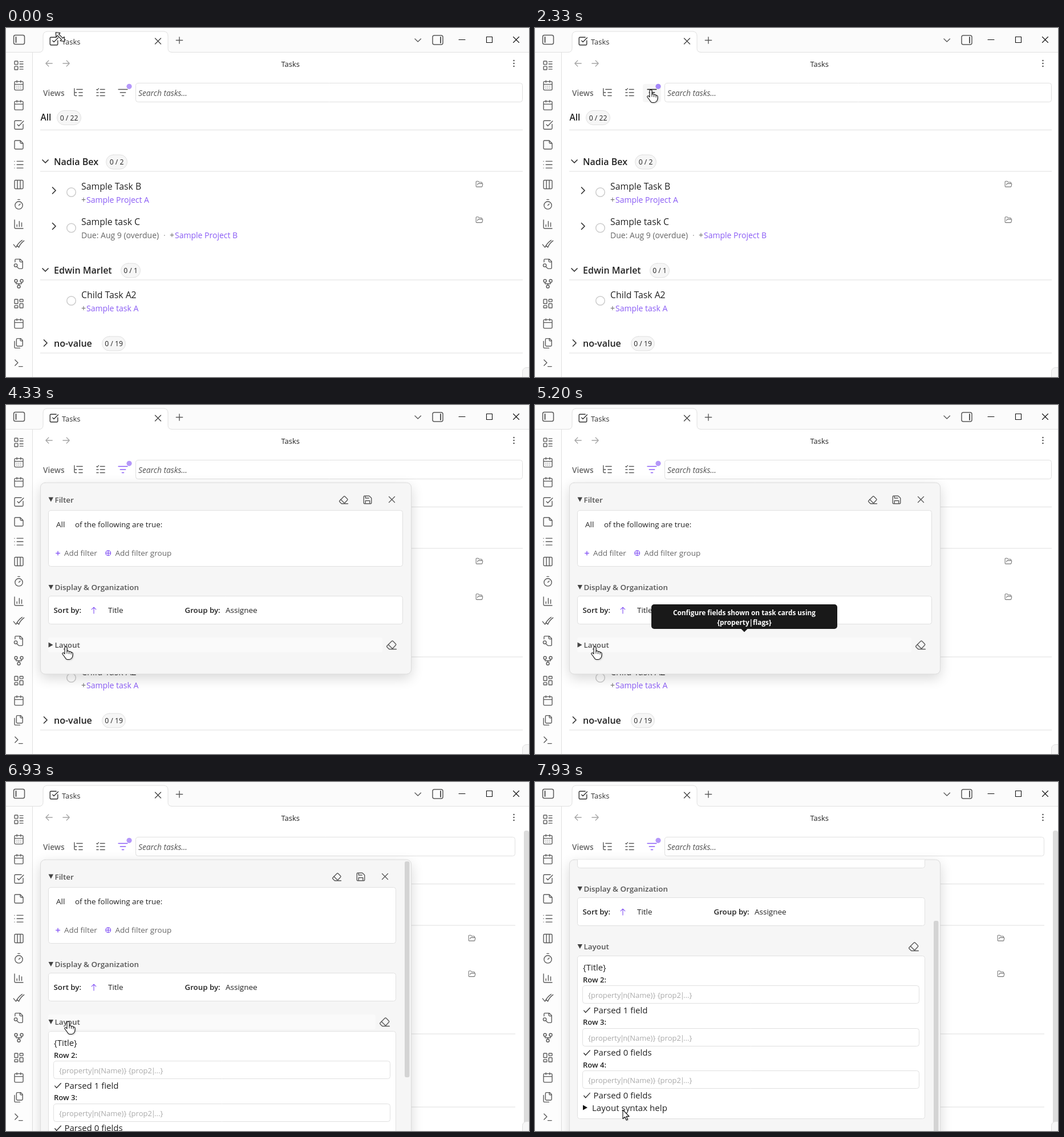
Recreate the animation shown at these times as an HTML page with a canvas. Size 917x611 px, loop 8000 ms.

```html
<!DOCTYPE html>
<html lang="en">
<head>
<meta charset="utf-8">
<title>Tasks</title>
<style>
html, body { margin: 0; width: 100%; height: 100%; overflow: hidden; background: #fff; }
canvas { display: block; }
</style>
</head>
<body>
<canvas id="stage" width="917" height="611"></canvas>
<script>
const ctx = document.getElementById('stage').getContext('2d');
const STEP = 8000 / 120;
const FONT = '"Open Sans", "Noto Sans", sans-serif';
const INK = '#222', GREY = '#5a5a5a', LINE = '#e0e0e0', SOFT = '#f6f6f6', PURPLE = '#8a5cf5';

const box = (x, y, w, h, r = 0) => r
  ? `M${x + r} ${y}h${w - 2 * r}a${r} ${r} 0 0 1 ${r} ${r}v${h - 2 * r}a${r} ${r} 0 0 1 ${-r} ${r}h${2 * r - w}a${r} ${r} 0 0 1 ${-r} ${-r}v${2 * r - h}a${r} ${r} 0 0 1 ${r} ${-r}z`
  : `M${x} ${y}h${w}v${h}h${-w}z`;
const ring = (x, y, r) => `M${x + r} ${y}a${r} ${r} 0 1 1 ${-2 * r} 0a${r} ${r} 0 1 1 ${2 * r} 0`;
const dots = (xs, y) => xs.map(x => `M${x} ${y}h.01`).join('');
const calendar = box(3, 4, 18, 18, 2) + 'M3 10h18M8 2v4M16 2v4';

// Icons on a 24 unit grid
const ICONS = {
  blocks: box(3, 3, 7, 7, 1) + box(3, 14, 7, 7, 1) + 'M14 4h7M14 9h7M14 15h7M14 20h7',
  days: calendar + dots([8, 12, 16], 14) + dots([8, 12, 16], 18),
  calendar,
  check: 'M21 10.5V19a2 2 0 0 1-2 2H5a2 2 0 0 1-2-2V5a2 2 0 0 1 2-2h12.5M9 11l3 3L22 4',
  note: 'M15 3H5a2 2 0 0 0-2 2v14a2 2 0 0 0 2 2h14a2 2 0 0 0 2-2V9zM15 3v4a2 2 0 0 0 2 2h4',
  list: 'M3 5h.01M3 12h.01M3 19h.01M8 5h13M8 12h13M8 19h13',
  columns: box(3, 3, 18, 18, 2) + 'M9 3v18M15 3v18',
  timer: 'M10 2h4M12 14l3-3' + ring(12, 14, 8),
  chart: 'M3 3v16a2 2 0 0 0 2 2h16M8 17v-4M13 17V6M18 17V9',
  checks: 'M1 13l5 6C9 13 13 8 19 4M8 15l4 4C14 13 18 9 23 5',
  search: 'M14 2v4a2 2 0 0 0 2 2h4M4 8V4a2 2 0 0 1 2-2h9l5 5v13a2 2 0 0 1-2 2h-6M7.5 17.5L11 21' + ring(5.5, 15, 3.2),
  fork: ring(12, 18, 3) + ring(6, 6, 3) + ring(18, 6, 3) + 'M18 9v2q0 1-1 1H7q-1 0-1-1V9M12 12v3',
  board: box(3, 3, 7, 9, 1) + box(14, 3, 7, 5, 1) + box(14, 12, 7, 9, 1) + box(3, 16, 7, 5, 1),
  files: 'M20 7h-3a2 2 0 0 1-2-2V2M9 18a2 2 0 0 1-2-2V4a2 2 0 0 1 2-2h7l4 4v10a2 2 0 0 1-2 2zM3 7.6v12.8a1.6 1.6 0 0 0 1.6 1.6h9.8',
  terminal: 'M4 17l6-6-6-6M12 19h8',
  back: 'M20 12H4M11 5l-7 7 7 7',
  next: 'M4 12h16M13 5l7 7-7 7',
  tree: 'M8 5h13M13 12h8M13 19h8M3 3v14a2 2 0 0 0 2 2h3M3 10a2 2 0 0 0 2 2h3',
  steps: 'M11 5h10M11 12h10M11 19h10M3 5l1.5 1.5L7.5 3M3 12h4M3 19h4',
  filter: 'M2 5h20M6 12h12M10 19h4',
  folder: 'M6 14l1.5-2.9A2 2 0 0 1 9.2 10H20a2 2 0 0 1 1.9 2.5l-1.5 6a2 2 0 0 1-2 1.5H4a2 2 0 0 1-2-2V5a2 2 0 0 1 2-2h3.9a2 2 0 0 1 1.7.9l.8 1.2a2 2 0 0 0 1.7.9H18a2 2 0 0 1 2 2v2',
  eraser: 'M7 21l-4.3-4.3q-1.4-1.4 0-2.8l9.6-9.6q1.4-1.4 2.8 0l5.6 5.6q1.4 1.4 0 2.8L13 21M22 21H7M5 11l9 9',
  save: 'M15.2 3a2 2 0 0 1 1.4.6l3.8 3.8a2 2 0 0 1 .6 1.4V19a2 2 0 0 1-2 2H5a2 2 0 0 1-2-2V5a2 2 0 0 1 2-2zM17 21v-7H7v7M7 3v5h8',
  close: 'M18 6L6 18M6 6l12 12',
  plus: 'M4 12h16M12 4v16',
  circlePlus: ring(12, 12, 10) + 'M2 12h20M12 2v20',
  up: 'M12 22V3M5 9l7-7 7 7',
  tick: 'M3 13l5 6L21 5'
};
const RIBBON = 'blocks days calendar check note list columns timer chart checks search fork board calendar files terminal'.split(' ');

const HAND = 'M-2 2C-2-.5 2-.5 2 2V8C3 7 5.3 7.3 5.5 9C7 8 9 8.5 9 10.2C10.5 9.6 12 10.4 12 12V15C12 19 9 22.5 6 22.5H2.5C0 22.5-1 20-2.5 17.5L-6 13C-7 11.5-5 10-3.5 11.2L-2 12.8Z';
const ARROW = 'M0 0V15.5L3.6 12.3L6.2 18L8.6 17L6 11.4H11Z';
const RESIZE = 'M-11 0L-5-5V-1.5H5V-5L11 0L5 5V1.5H-5V5Z';

// Pointer stops: step, x, y
const PATH = [
  [0, 95, 15], [3, 154, 16], [5, 154, 16], [6, 156, 25], [10, 156, 25], [13, 155, 33],
  [15, 155, 33], [23, 200, 96], [24, 200, 96], [30, 203, 108], [42, 203, 108],
  [47, 166, 184], [55, 219, 314], [62, 103, 424], [64, 103, 424], [65, 105, 423],
  [93, 105, 423], [101, 107, 421], [103, 107, 421], [104, 109, 419], [111, 109, 419], [119, 154, 574]
];

function text(s, x, y, size = 13.5, color = INK, weight = 400, style = '') {
  ctx.font = `${style} ${weight} ${size}px ${FONT}`;
  ctx.fillStyle = color;
  ctx.fillText(s, x, y);
}
function stroke(d, color = GREY, width = 1.5) {
  ctx.strokeStyle = color;
  ctx.lineWidth = width;
  ctx.stroke(new Path2D(d));
}
function fill(d, color) {
  ctx.fillStyle = color;
  ctx.fill(new Path2D(d));
}
function icon(name, x, y, size = 20, color = GREY, width = 1.4) {
  const k = size / 24;
  ctx.save();
  ctx.translate(x - size / 2, y - size / 2);
  ctx.scale(k, k);
  stroke(ICONS[name], color, width / k);
  ctx.restore();
}
function frame(x, y, right, bottom, r = 4, bg = '#fff') {
  const d = box(x + .5, y + .5, right - x - 1, bottom - y - 1, r);
  fill(d, bg);
  stroke(d, LINE, 1);
}
const rule = (y, right) => fill(box(60, y, right - 60, 1), LINE);
const chevron = (x, y, down) =>
  stroke(down ? `M${x - 5} ${y - 2.5}l5 5 5-5` : `M${x - 2.5} ${y - 5.5}l5.5 5.5-5.5 5.5`, '#333', 1.7);
const triangle = (x, y, down, color = '#444') =>
  fill(down ? `M${x} ${y - 4}h8.5l-4.25 8z` : `M${x} ${y - 4.5}v9l8-4.5z`, color);

function badge(s, x, right, y) {
  frame(x, y, right, y + 26, 12.5, SOFT);
  ctx.textAlign = 'center';
  text(s, (x + right) / 2, y + 17.5, 12.2, INK, 500);
  ctx.textAlign = 'left';
}
function group(name, y, count, x, right, edge, open = true) {
  chevron(69, y, open);
  text(name, 84, y + 6.5, 16, INK, 600);
  badge(count, x, right, y - 12);
  rule(y + 17, edge);
}
function task(name, y, link, edge, parent, due) {
  if (parent) {
    chevron(84, y + 8, false);
    icon('folder', edge - 76, y - 3, 14, '#777', 1.1);
  }
  stroke(ring(114.5, y + 11, 7.8), '#ccc', 1.5);
  text(name, 132, y + 6, 15.8);
  let x = 132;
  if (due) {
    text(due, x, y + 29, 14, '#666');
    text('·', 276, y + 29, 14, '#999');
    x = 287;
  }
  text('+', x, y + 29, 14, '#666');
  text(link, x + 9, y + 29, 14, PURPLE);
}

function chrome() {
  fill(box(0, 0, 917, 43), '#fbfbfb');
  fill(box(0, 42, 46, 569), '#fdfdfd');
  fill(box(0, 42, 917, 1), LINE);
  fill(box(46, 42, 1, 569), LINE);
  const tab = 'M58 42.5q7 0 7-7V14q0-8 8-8h203q8 0 8 8v21.5q0 7 7 7';
  fill(tab + 'v1H58z', '#fff');
  stroke(tab, LINE, 1);
  icon('check', 84, 23, 18, '#333', 1.4);
  text('Tasks', 98, 28.5, 12.9, '#333');
  icon('close', 266.5, 23, 20, '#444');
  icon('plus', 304, 21.5, 17);
  stroke(box(13.5, 12.5, 19, 16, 3));
  stroke('M17.5 16v9', GREY, 2);
  stroke(box(748, 13, 18, 16, 3));
  stroke('M762 16v10', GREY, 2);
  stroke('M717 19l5.2 5 5.2-5', GREY, 1.4);
  stroke('M794 20.5h11' + box(842.5, 15.5, 10, 10) + 'M889.5 15.5l10 10M899.5 15.5l-10 10', '#111', 1.1);
  RIBBON.forEach((name, i) => icon(name, 22.5, 65.5 + i * 34.75));
  icon('back', 75.5, 62, 17, '#a5a5a5', 1.3);
  icon('next', 105.5, 62, 17, '#a5a5a5', 1.3);
  text('Tasks', 482.5, 67.5, 12.9, INK, 500);
  for (const y of [57, 62, 67]) fill(ring(890.5, y, 1.3), '#555');
}

function page(edge, k) {
  const hover = k >= 25 && k < 49;
  text('Views', 65, 118.5, 13.6, '#666', 600);
  icon('tree', 127, 113, 19);
  icon('steps', 166, 113, 19);
  if (hover) fill(box(189, 98, 32, 32, 4), SOFT);
  icon('filter', 205, 113, 19, hover ? INK : k >= 49 ? PURPLE : GREY);
  fill(ring(216, 102.3, 4.6), hover ? '#a588fa' : '#b598fa');
  frame(227, 96, edge, 130);
  text('Search tasks...', 232, 118.5, 13.8, '#555', 400, 'italic');

  text('All', 60.5, 162, 15.4, INK, 600);
  badge('0 / 22', 89, 132, 144);
  rule(178, edge);
  group('Nadia Bex', 233.5, '0 / 2', 175, 213, edge);
  task('Sample Task B', 276.5, 'Sample Project A', edge, true);
  task('Sample task C', 339, 'Sample Project B', edge, true, 'Due: Aug 9 (overdue)');
  group('Edwin Marlet', 423.5, '0 / 1', 201, 236, edge);
  task('Child Task A2', 466.5, 'Sample task A', edge);
  group('no-value', 551.5, '0 / 19', 168, 210, edge, false);
}

function heading(s, y, open, right, hover) {
  if (hover) fill(box(74, y - 13, right - 110, 26, 4), '#fafafa');
  triangle(74.5, y, open);
  text(s, 85.5, y + 5, 13.4, '#555', 600);
}

function layoutRows(right) {
  frame(74, 436, right, 722);
  text('{Title}', 84, 462, 14.9);
  for (let i = 0; i < 3; i++) {
    const y = 488 + i * 74.6;
    text(`Row ${i + 2}:`, 84, y - 5.5, 13, INK, 600);
    frame(83, Math.round(y), right - 10, Math.round(y) + 32, 4);
    text('{property', 93, y + 22, 13, '#aaa');
    text('|', 149, y + 22, 13, '#aaa');
    text('n(Name)} {prop2', 154.3, y + 22, 13, '#aaa');
    text('|', 254.7, y + 22, 13, '#aaa');
    text('...}', 260, y + 22, 13, '#aaa');
    icon('tick', 91, y + 43.5, 14, '#333', 1.4);
    text(i ? 'Parsed 0 fields' : 'Parsed 1 field', 102.5, y + 48.8, 15);
  }
  triangle(84, 702, false, '#111');
  text('Layout syntax help', 100, 708, 15.1);
}

function panel(open, scroll, inZone, k) {
  const right = open ? 684 : 696;
  const shape = box(60.5, 136, 650, open ? 490 : 335, 8);
  ctx.save();
  ctx.shadowColor = 'rgba(0,0,0,.16)';
  ctx.shadowBlur = 22;
  ctx.shadowOffsetY = 7;
  fill(shape, SOFT);
  ctx.restore();
  stroke(shape, '#dcdcdc', 1);
  ctx.save();
  ctx.clip(new Path2D(shape));
  ctx.translate(0, -scroll);

  heading('Filter', 165.5, true, right);
  icon('eraser', right - 104, 166, 18);
  icon('save', right - 62, 166, 18);
  icon('close', right - 19.5, 165.5, 20);
  frame(74, 184, right, 283);
  text('All', 88, 214, 13.5);
  text('of the following are true:', 121, 214, 13.4);
  icon('plus', 91, 259.5, 10, PURPLE, 1.5);
  text('Add filter', 102, 263.5, 13.5, '#666');
  icon('circlePlus', 179.2, 259.3, 10.5, PURPLE, 1.3);
  text('Add filter group', 191.5, 263.5, 13.5, '#666');

  heading('Display & Organization', 319, true, right, k < 60 && inZone === 319);
  frame(74, 334, right, 384);
  text('Sort by:', 83.5, 364, 13.3, INK, 600);
  icon('up', 154, 359.5, 13, PURPLE, 1.2);
  text('Title', 179, 364, 13.4);
  text('Group by:', 313.5, 364, 13.3, INK, 600);
  text('Assignee', 385, 364, 13.5);

  heading('Layout', 420, open, right, inZone === 420);
  icon('eraser', right - 20, 420, 20);
  if (open) layoutRows(right);
  ctx.restore();
  if (open) fill(box(699, 139 + scroll * 104 / 132, 8.5, 378, 3), '#d4d4d4');
}

function tooltip(p) {
  const scale = p < .4 ? 1 + p / .4 * .05 : 1 + (1 - p) / .6 * .05;
  ctx.save();
  ctx.globalAlpha = Math.min(1, p / .4);
  ctx.translate(367, 349);
  ctx.scale(scale, scale);
  fill(box(-163, 0, 326, 43, 5), '#191919');
  fill('M-6 42.5h12l-6 6z', '#191919');
  ctx.textAlign = 'center';
  text('Configure fields shown on task cards using', 0, 18.5, 11.8, '#fff', 700);
  text('{property|flags}', 0, 35.5, 11.8, '#fff', 700);
  ctx.restore();
}

function pointer(k) {
  const i = Math.max(1, PATH.findIndex(p => p[0] >= k));
  const [k0, x0, y0] = PATH[i - 1], [k1, x1, y1] = PATH[i];
  const p = (k - k0) / (k1 - k0);
  return [x0 + (x1 - x0) * p, y0 + (y1 - y0) * p];
}
function drawPointer(x, y, d, turn = 0) {
  ctx.save();
  ctx.translate(x, y);
  ctx.rotate(turn);
  ctx.save();
  ctx.shadowColor = 'rgba(0,0,0,.3)';
  ctx.shadowBlur = 3;
  ctx.shadowOffsetX = ctx.shadowOffsetY = 1;
  fill(d, '#fff');
  ctx.restore();
  stroke(d, '#111', 1.1);
  if (d === HAND) stroke('M2 8v4M5.5 9v3.5M9 10.2v3', '#111', 1);
  ctx.restore();
}

function draw(k) {
  const open = k >= 96;
  const edge = open ? 893 : 906;
  const [x, y] = pointer(k);
  const q = Math.min(1, Math.max(0, (k - 104) / 3));
  const scroll = Math.round(132 * q * q * (3 - 2 * q));
  const onButton = k >= 25 && x > 189 && y > 97 && y < 132;
  const inZone = k >= 43 && k < 112 && [166, 319, 420].find(z => Math.abs(y - z) < (z === 166 ? 19 : 13));

  ctx.fillStyle = '#fff';
  ctx.fillRect(0, 0, 917, 611);
  ctx.lineCap = ctx.lineJoin = 'round';
  chrome();
  page(edge, k);
  if (open) fill(box(908, 85, 9, 526, 4), '#dcdcdc');
  frame(905, 594, 930, 625, 7, SOFT);
  if (k >= 36) panel(open, scroll, inZone, k);
  if (k >= 75 && !open) tooltip(Math.min(1, (k - 74.6) / 3));

  if (k === 0) drawPointer(x, y + .5, RESIZE, Math.PI / 4);
  else drawPointer(x, y, onButton || inZone ? HAND : ARROW);
}

const start = performance.now();
let last = -1;
function tick() {
  const t = (performance.now() - start) % 8000;
  const k = Math.floor((t + 3) / STEP) % 120;
  if (k !== last) draw(last = k);
  requestAnimationFrame(tick);
}
tick();
</script>
</body>
</html>
```
